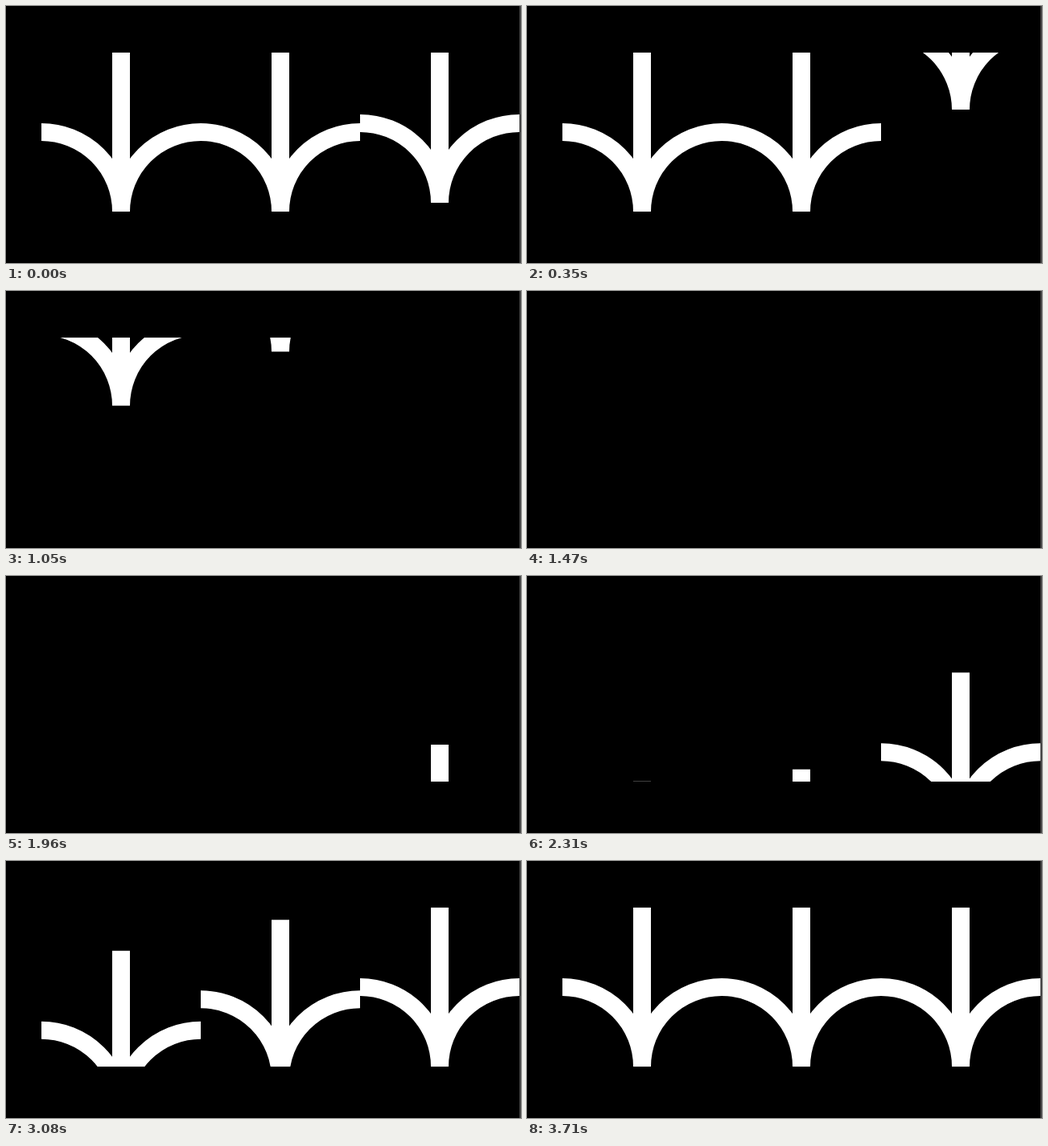
Write an HTML page that moves like this. It is 640 px wide and 320 px high and loops after 4060 ms.

```html
<!DOCTYPE html>
<html lang="en">
<head>
<meta charset="utf-8">
<title>Arches</title>
<style>
  html, body { margin: 0; width: 100%; height: 100%; overflow: hidden; background: #000; }
  #stage { display: block; width: 100%; height: 100%; }
  .cell { overflow: hidden; }
  .glyph { fill: none; stroke: #fff; stroke-width: 22; }
</style>
</head>
<body>
<svg id="stage" viewBox="0 0 640 320">
  <rect width="640" height="320" fill="#000"/>
  <rect x="638" width="2" height="320" fill="#444"/>
</svg>
<script>
const NS = 'http://www.w3.org/2000/svg';
const SIZE = 198, LEFT = 44, TOP = 58;
const LOOP = 4060, STEP = 70;
const OUT = { start: -140, length: 840 };
const IN = { start: 1540, length: 1260 };
const DELAYS = [735, 525, 0];
const SHAPE = 'M99 0V198M0 99A99 99 0 0 1 99 198M198 99A99 99 0 0 0 99 198';

function add(parent, tag, attrs) {
  const el = document.createElementNS(NS, tag);
  for (const key in attrs) el.setAttribute(key, attrs[key]);
  return parent.appendChild(el);
}

// cubic-bezier(.42, 0, .58, 1)
function easeInOut(x) {
  if (x <= 0) return 0;
  if (x >= 1) return 1;
  let lo = 0, hi = 1;
  for (let i = 0; i < 24; i++) {
    const s = (lo + hi) / 2, r = 1 - s;
    const bx = 3 * r * r * s * 0.42 + 3 * r * s * s * 0.58 + s * s * s;
    if (bx < x) lo = s; else hi = s;
  }
  return lo * lo * (3 - 2 * lo);
}

const progress = (phase, t, delay) =>
  easeInOut((t - phase.start - delay) / phase.length);

// Columns leave through the top, then rise again from below.
function offset(t, delay) {
  return t < IN.start
    ? -SIZE * progress(OUT, t, delay)
    : SIZE * (1 - progress(IN, t, delay));
}

const stage = document.getElementById('stage');
const glyphs = DELAYS.map((_, i) => {
  const cell = add(stage, 'svg', {
    class: 'cell', x: LEFT + i * SIZE, y: TOP, width: SIZE, height: SIZE
  });
  return add(cell, 'path', { class: 'glyph', d: SHAPE });
});

function draw(ms) {
  const t = Math.floor((ms % LOOP) / STEP) * STEP;
  glyphs.forEach((glyph, i) => {
    glyph.setAttribute('transform', `translate(0 ${offset(t, DELAYS[i]).toFixed(3)})`);
  });
}

let origin = null;
function tick(now) {
  if (origin === null) origin = now;
  draw(now - origin);
  requestAnimationFrame(tick);
}
draw(0);
requestAnimationFrame(tick);
</script>
</body>
</html>
```
